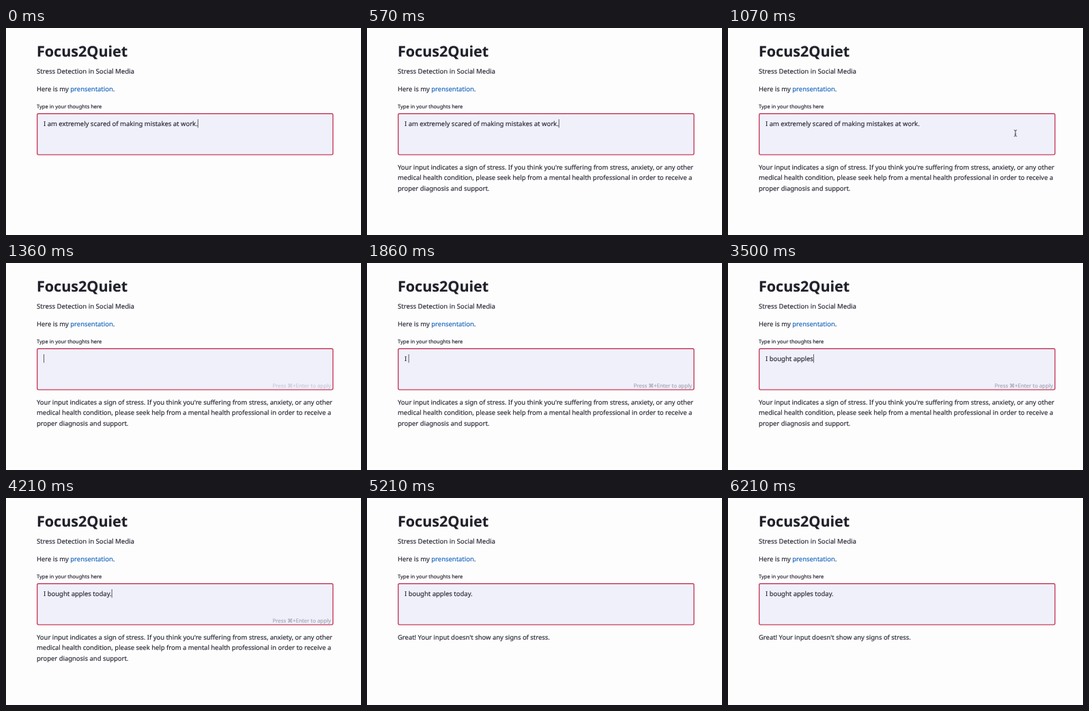
Write an HTML page that moves like this. It is 520x304 px and loops after 6.5 s.

```html
<!DOCTYPE html>
<html lang="en">
<head>
<meta charset="utf-8">
<title>Stress Detection</title>
<style>
  html, body { margin: 0; width: 100%; height: 100%; overflow: hidden; background: #fefdfe; }
  svg { display: block; }
  .page { filter: blur(.3px); }
  text {
    font: 9.45px "Noto Sans", "Open Sans", sans-serif;
    fill: #292b36;
    stroke: #292b36;
    stroke-width: .18px;
    white-space: pre;
    text-rendering: geometricPrecision;
  }
  .title { font-size: 21.5px; font-weight: 700; fill: #20212a; }
  .intro { font-size: 9.6px; }
  .label { font-size: 7.5px; }
  .link { fill: #1a68bd; stroke: #1a68bd; }
  .hint { font-size: 7.85px; fill: #a5a6b5; stroke: #a5a6b5; text-anchor: end; }
  #typed { font-size: 9.48px; }
</style>
</head>
<body>
<svg width="520" height="304" viewBox="0 0 520 304">
<g class="page">
  <text class="title" x="45" y="42">Focus2Quiet</text>
  <text class="intro" x="45" y="67">Stress Detection in Social Media</text>
  <text x="45" y="92.5">Here is my <tspan class="link">prensentation</tspan>.</text>
  <text class="label" x="45" y="118">Type in your thoughts here</text>

  <rect x="45.7" y="125.7" width="433.2" height="60.4" rx="2" fill="#f0f0fb" stroke="#c53d59" stroke-width="1.4"/>
  <rect id="selection" x="55" y="134" height="13" fill="#b4d3fa"/>
  <text id="typed" x="55" y="144"></text>
  <rect id="caret" y="134" width=".9" height="12.5" fill="#4a4b56"/>
  <text class="hint" id="hint" x="476" y="183.2">Press ⌘+Enter to apply</text>

  <g id="stressed">
    <text x="45" y="207.7">Your input indicates a sign of stress. If you think you're suffering from stress, anxiety, or any other</text>
    <text x="45" y="223.2">medical health condition, please seek help from a mental health professional in order to receive a</text>
    <text x="45" y="238.8">proper diagnosis and support.</text>
  </g>
  <text id="calm" x="45" y="207.7">Great! Your input doesn't show any signs of stress.</text>

  <path id="beam" d="M-2.2-4.6Q0-4.6 0-3V3Q0 4.6-2.2 4.6M2.2-4.6Q0-4.6 0-3M0 3Q0 4.6 2.2 4.6M-1.2 1.5H1.2"
        fill="none" stroke="#33343f" stroke-width=".9"/>
  <path id="arrow" d="M0 0V10L2.4 7.8 4 11.4 5.6 10.7 4.1 7.2H7.2Z" fill="#111" stroke="#fff" stroke-width=".7"/>
</g>
</svg>
<script>
const LOOP = 6500;
const BLINK = 285;
const FIRST = "I am extremely scared of making mistakes at work.";

// Moments of the story, in ms
const ANSWER = 140, MOVE = 710, ARRIVE = 1070, SELECT = 1210, CLEAR = 1360, APPLY = 4860, SWAP = 5210;

// Bursts of typing at an even pace
const BURSTS = [
  { at: 1710, pace: 143, text: "I bou" },
  { at: 2640, pace: 100, text: "ght ap" },
  { at: 3290, pace: 70, text: "ples " },
  { at: 3710, pace: 72, text: "today" },
  { at: 4210, pace: 70, text: "." }
];
const KEYS = BURSTS.flatMap(({ at, pace, text }) =>
  [...text].map((char, i) => ({ char, time: at + i * pace })));

const el = id => document.getElementById(id);
const [typed, caret, hint, selection, stressed, calm, beam, arrow] =
  ["typed", "caret", "hint", "selection", "stressed", "calm", "beam", "arrow"].map(el);

const ramp = (t, from, to) => Math.min(1, Math.max(0, (t - from) / (to - from)));
const within = (t, from, to) => t >= from && t < to;
const show = (node, opacity) => node.setAttribute("opacity", Number(opacity));

function drawField(t) {
  const pressed = KEYS.filter(key => key.time <= t);
  typed.textContent = t < CLEAR ? FIRST : pressed.map(key => key.char).join("");
  const width = typed.textContent ? typed.getComputedTextLength() : 0;

  // The caret stays lit after each edit, then blinks.
  const lastEdit = pressed.at(-1)?.time ?? (t < CLEAR ? 0 : CLEAR);
  const lit = Math.floor((t - lastEdit) / BLINK) % 2 === 0;
  const selected = within(t, SELECT, CLEAR);
  caret.setAttribute("x", 55 + width);
  show(caret, lit && !selected);
  selection.setAttribute("width", width);
  show(selection, selected);
  show(hint, t < APPLY ? ramp(t, CLEAR - 70, CLEAR + 70) : 0);
}

function drawPointer(t) {
  const ease = 1 - (1 - ramp(t, MOVE, ARRIVE)) ** 1.5;
  const x = 448 - 27 * ease;
  const y = 289 - 134.5 * ease;
  const visible = within(t, MOVE, CLEAR);
  const overText = y < 243;
  show(beam, visible && overText);
  show(arrow, visible && !overText);
  for (const node of [beam, arrow]) node.setAttribute("transform", `translate(${x} ${y})`);
}

function draw(t) {
  drawField(t);
  drawPointer(t);
  show(stressed, t < SWAP ? ramp(t, ANSWER - 50, ANSWER + 150) * (t >= ANSWER) : 0);
  show(calm, t >= SWAP);
}

const start = performance.now();
function tick() {
  draw((performance.now() - start) % LOOP);
  requestAnimationFrame(tick);
}
tick();
</script>
</body>
</html>
```
